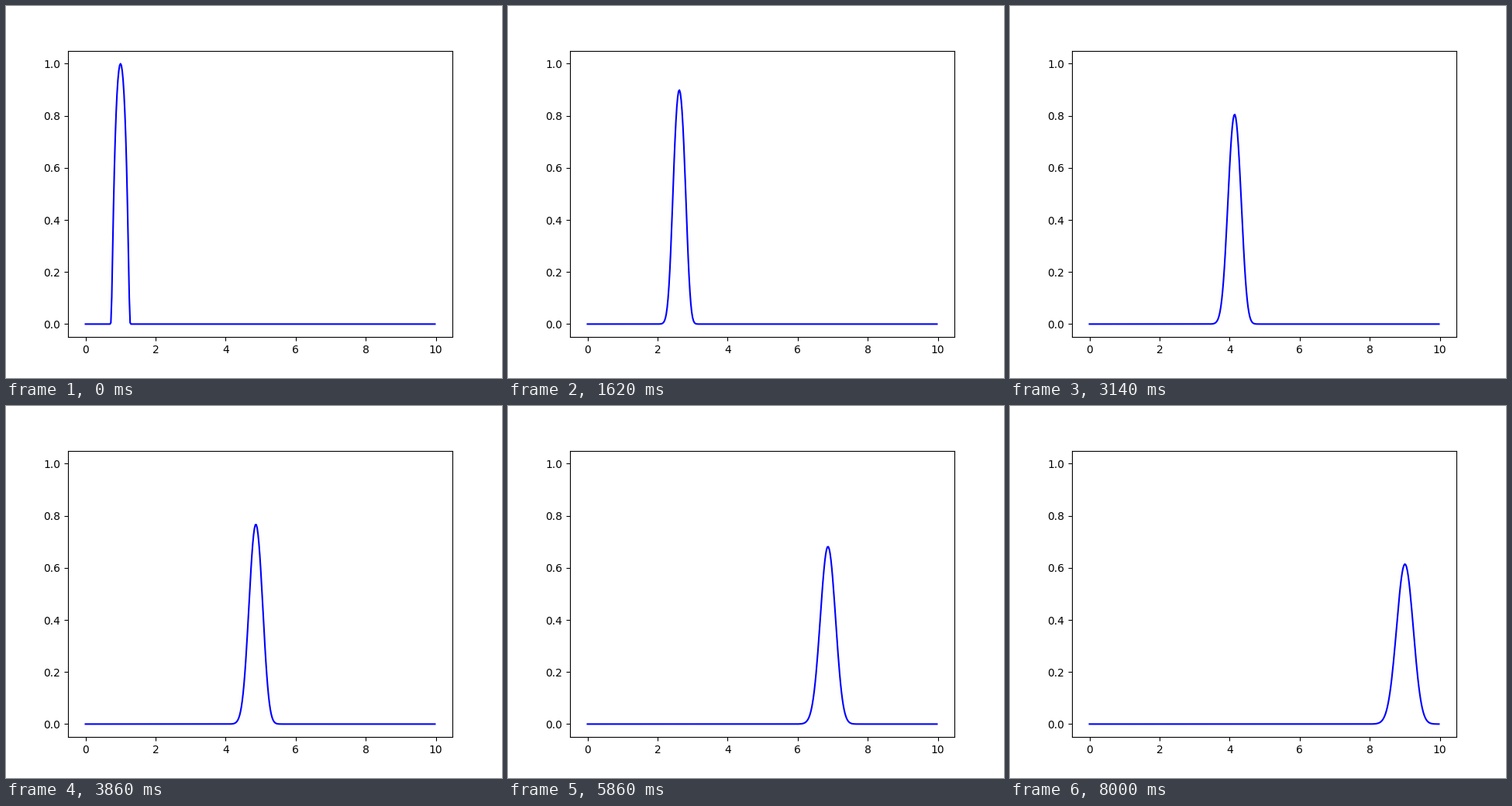
Recreate the animation shown at these times as a matplotlib script. Size 640 by 480 pixels, loop 8020 ms.

```python
import numpy as np
import matplotlib.pyplot as plt
from matplotlib.animation import FuncAnimation

LENGTH, CELLS = 10.0, 400
SPEED, DT, FRAMES = 1.0, 0.02, 401

dx = LENGTH / CELLS
x = np.arange(CELLS) * dx
courant = SPEED * DT / dx


def bump(x, center=1.0, radius=0.3):
    """Smooth bump of height 1 with compact support."""
    s = ((x - center) / radius) ** 2
    u = np.zeros_like(x)
    inside = s < 1 - 1e-9
    u[inside] = np.exp(1 - 1 / (1 - s[inside]))
    return u


def upwind(u):
    """One first-order upwind step of the advection equation."""
    return u - courant * (u - np.roll(u, 1))


states = [bump(x)]
for _ in range(FRAMES - 1):
    states.append(upwind(states[-1]))

fig, ax = plt.subplots(figsize=(6.4, 4.8), dpi=100)
line, = ax.plot(x, states[0], "b")


def update(i):
    line.set_ydata(states[i])
    return line,


anim = FuncAnimation(fig, update, frames=FRAMES, interval=20,
                     repeat=True, repeat_delay=0)
plt.show()
```
